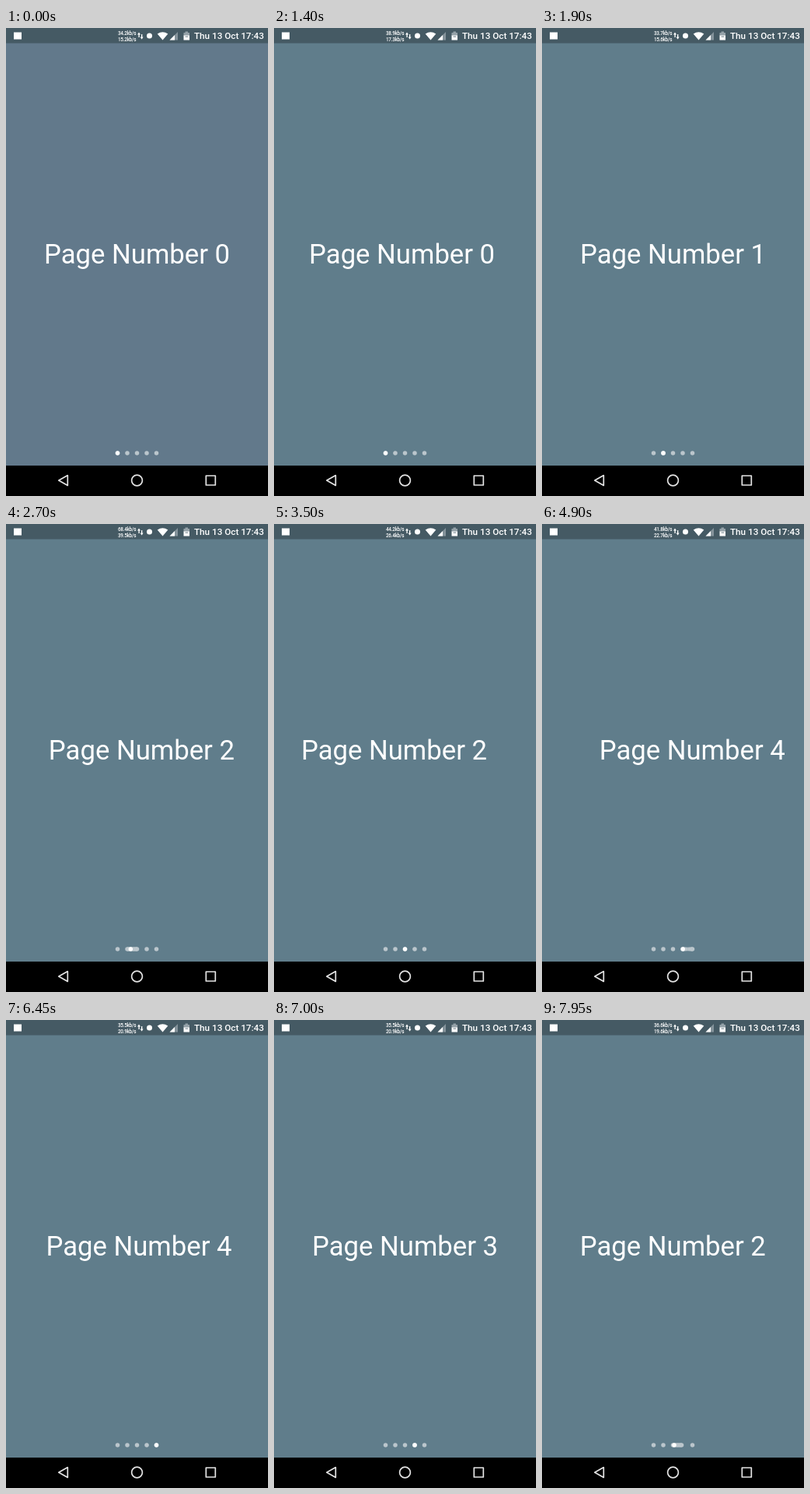
These frames come from a looping animation (337 px wide and 600 px high, 8000 ms). An HTML page with a canvas:

```html
<!DOCTYPE html>
<html lang="en">
<head>
<meta charset="utf-8">
<title>Pager</title>
<style>
  html, body { margin: 0; width: 100%; height: 100%; overflow: hidden; background: #000; }
  canvas { display: block; }
</style>
</head>
<body>
<canvas id="stage" width="337" height="600"></canvas>
<script>
const ctx = document.getElementById('stage').getContext('2d');
const W = 337, H = 600, LOOP = 8000, STEP = 50;
const MARGIN = 12, PAGE = W - 2 * MARGIN;
const DOT_Y = 545, DOT_R = 2.75, DOT_COLOR = '#bbc6cc';
const dotX = i => 143.5 + 12.5 * i;

// release: ms after the start at which the finger lets go
const swipes = [
  { at: 1400, from: 0, to: 1, release: 150 },
  { at: 2400, from: 1, to: 2, release: 150 },
  { at: 3450, from: 2, to: 3, release: 190 },
  { at: 4650, from: 3, to: 4, release: 150 },
  { at: 6450, from: 4, to: 3, release: 190 },
  { at: 7450, from: 3, to: 2, release: 275 }
];

// network speed, renewed once a second from 450 ms on
const speeds = [
  ['34.2', '15.2'], ['38.9', '17.3'], ['33.7', '15.6'], ['68.4', '39.5'], ['44.2', '26.4'],
  ['41.8', '22.7'], ['37.3', '21.4'], ['35.5', '20.9'], ['36.6', '19.6']
];

const clamp = v => Math.min(1, Math.max(0, v));
const lerp = (a, b, k) => a + (b - a) * k;

// cubic-bezier(.4, 0, .2, 1)
function ease(x) {
  if (x <= 0) return 0;
  if (x >= 1) return 1;
  let lo = 0, hi = 1, s = 0.5;
  for (let i = 0; i < 20; i++) {
    s = (lo + hi) / 2;
    const bx = 1.2 * s * (1 - s) ** 2 + 0.6 * s * s * (1 - s) + s ** 3;
    if (bx < x) lo = s; else hi = s;
  }
  return 3 * s * s * (1 - s) + s ** 3;
}

// accelerating drag, then a quintic settle
function dragProgress(time, release) {
  if (time < release) return 0.4 * clamp((time + STEP) / (release + STEP)) ** 2.5;
  return 1 - 0.6 * (1 - clamp((time - release) / 300)) ** 5;
}

function rect(x, y, w, h, color) {
  ctx.fillStyle = color;
  ctx.fillRect(x, y, w, h);
}

function disc(x, y, r, color) {
  ctx.fillStyle = color;
  ctx.beginPath();
  ctx.arc(x, y, r, 0, 7);
  ctx.fill();
}

function shape(color, ...points) {
  ctx.fillStyle = color;
  ctx.beginPath();
  points.forEach(p => ctx.lineTo(...p));
  ctx.closePath();
  ctx.fill();
}

function text(str, x, y, font, align = 'left', spacing = 0) {
  ctx.font = font + ' Roboto, sans-serif';
  ctx.textAlign = align;
  ctx.letterSpacing = spacing + 'px';
  ctx.fillStyle = '#fff';
  ctx.fillText(str, x, y);
}

function drawStatusBar(t) {
  rect(0, 0, W, 19.5, '#455a64');
  rect(10, 5.5, 10, 9, '#fff');
  const speed = speeds[Math.floor((t + 550) / 1000)];
  speed.forEach((v, i) => text(v + 'kb/s', 144, 9 + 7.5 * i, '500 6.4px', 'left', -0.28));

  // data arrows
  shape('#fff', [169, 8.5], [171, 5.5], [173, 8.5]);
  rect(170.4, 8, 1.3, 4, '#fff');
  shape('#fff', [172.6, 11.5], [174.6, 14.5], [176.6, 11.5]);
  rect(174, 8, 1.3, 4, '#fff');

  disc(184.5, 10, 3.5, '#fff');

  // wifi
  ctx.fillStyle = '#fff';
  ctx.beginPath();
  ctx.moveTo(201.5, 15.5);
  ctx.lineTo(194.7, 7.6);
  ctx.quadraticCurveTo(201.5, 2.8, 208.3, 7.6);
  ctx.fill();

  // signal
  shape('#84929a', [210.5, 15.5], [221, 15.5], [221, 5]);
  shape('#fff', [210.5, 15.5], [217, 15.5], [217, 9]);

  // battery
  rect(230.5, 4.5, 3.5, 2, '#94a1a8');
  rect(228.5, 6, 7.5, 4, '#94a1a8');
  rect(228.5, 9.5, 7.5, 6, '#fff');
  rect(230.5, 10.5, 3.5, 1.2, '#84929a');

  text('Thu 13 Oct 17:43', 242, 14.2, '500 11.7px');
}

function drawNavBar() {
  rect(0, 561, W, H - 561, '#000');
  ctx.strokeStyle = '#e4e4e4';
  ctx.lineWidth = 1.7;
  ctx.lineJoin = 'round';
  ctx.beginPath();
  ctx.moveTo(67.8, 580);
  ctx.lineTo(79.3, 573.6);
  ctx.lineTo(79.3, 586.4);
  ctx.closePath();
  ctx.moveTo(175.4, 580);
  ctx.arc(168.5, 580, 6.9, 0, 2 * Math.PI);
  ctx.rect(257.3, 574, 12, 12);
  ctx.stroke();
}

function drawPages(from, to, progress) {
  ctx.save();
  ctx.beginPath();
  ctx.rect(MARGIN, 20, PAGE, 541);
  ctx.clip();
  const position = lerp(from, to, progress);
  for (const i of new Set([from, to]))
    text('Page Number ' + i, W / 2 + (i - position) * PAGE, 301.7, '34.7px', 'center');
  ctx.restore();
}

// two dots that grow towards each other and merge into a pill
function drawJoin(a, b, f) {
  const mid = (a + b) / 2;
  const neck = DOT_R * Math.max(0, 2 * f - 1);
  for (const x of [a, b]) {
    disc(x, DOT_Y, DOT_R, DOT_COLOR);
    const side = Math.sign(mid - x);
    const tip = x + side * lerp(DOT_R, Math.abs(mid - x), clamp(2 * f));
    const bend = (x + tip) / 2;
    ctx.beginPath();
    ctx.moveTo(x, DOT_Y - DOT_R);
    ctx.quadraticCurveTo(bend, DOT_Y - neck, tip + side * 0.1, DOT_Y - neck);
    ctx.lineTo(tip + side * 0.1, DOT_Y + neck);
    ctx.quadraticCurveTo(bend, DOT_Y + neck, x, DOT_Y + DOT_R);
    ctx.fill();
  }
}

function drawIndicator(from, to, progress, since) {
  const selected = ease((since - 80) / 240);
  const retreat = ease((since - 195) / 160);
  const a = dotX(from), b = dotX(to);
  for (let i = 0; i < 5; i++)
    if (i !== from && i !== to) disc(dotX(i), DOT_Y, DOT_R, DOT_COLOR);
  if (retreat > 0) {
    disc(a, DOT_Y, DOT_R * retreat, DOT_COLOR);
    drawJoin(lerp(a, b, retreat), b, 1);
  } else {
    drawJoin(a, b, progress);
  }
  disc(lerp(a, b, selected), DOT_Y, DOT_R, '#fff');
}

function draw(t) {
  const swipe = swipes.filter(s => s.at <= t).pop();
  rect(0, 0, W, H, swipe ? '#607d8b' : '#62798b');
  const { at, from, to, release } = swipe || { ...swipes[0], at: LOOP };
  const progress = swipe ? dragProgress(t - at, release) : 0;
  drawPages(from, to, progress);
  drawIndicator(from, to, progress, t - at - release);
  drawStatusBar(t);
  drawNavBar();
}

const start = performance.now();
function tick() {
  const t = (performance.now() - start) % LOOP;
  draw(Math.floor(t / STEP) * STEP);
  requestAnimationFrame(tick);
}
tick();
</script>
</body>
</html>
```
